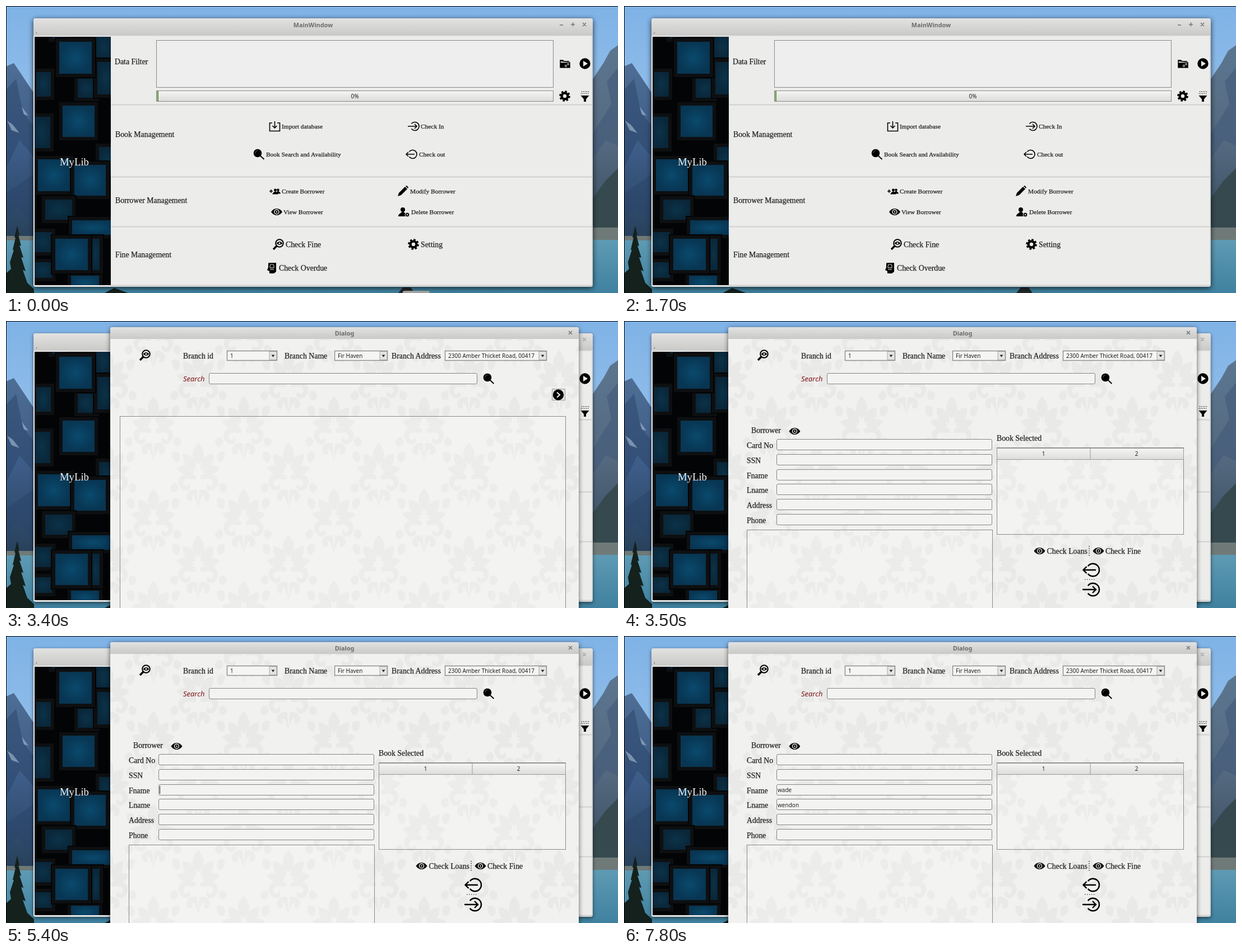
These frames come from a looping animation (1092 px wide and 513 px high, 8 s). An HTML page:

```html
<!DOCTYPE html>
<html lang="en">
<head>
<meta charset="utf-8">
<title>Library manager</title>
<style>
  html, body { margin: 0; width: 100%; height: 100%; overflow: hidden; background: #000; }
  svg { display: block; }
  text { font: 10px "Noto Sans", sans-serif; fill: #222; white-space: pre; }
  .label, .small, .brand { font-family: "Liberation Serif", serif; stroke: #222; stroke-width: .25px; }
  .label { font-size: 13.8px; }
  .small { font-size: 11.4px; }
  .brand { font-size: 18.7px; fill: #f4f4f4; stroke: none; }
  .title { font-size: 10.8px; font-weight: bold; fill: #6b6b6b; text-anchor: middle; }
  .mid { text-anchor: middle; }
  .search { font-size: 12.9px; font-style: italic; fill: #7d1414; }
  .line { fill: none; stroke: #000; }
  .box { fill: #fff; fill-opacity: .12; stroke: #8a8a8a; }
  .field { fill: #f3f3f1; stroke: #858585; }
</style>
</head>
<body>
<svg id="stage" width="1092" height="513" viewBox="0 0 1092 513">
  <defs>
    <linearGradient id="sky" x2="0" y2="1"><stop stop-color="#7fb2e6"/><stop offset="1" stop-color="#a9cff0"/></linearGradient>
    <linearGradient id="west" x2="0" y2="1"><stop stop-color="#4f6e95"/><stop offset=".5" stop-color="#3c5b86"/><stop offset="1" stop-color="#263f58"/></linearGradient>
    <linearGradient id="east" x2="0" y2="1"><stop stop-color="#5c7690"/><stop offset=".5" stop-color="#54697f"/><stop offset="1" stop-color="#34495a"/></linearGradient>
    <linearGradient id="lake" x2="0" y2="1"><stop stop-color="#5f9bb4"/><stop offset="1" stop-color="#3f819f"/></linearGradient>
    <linearGradient id="bar" x2="0" y2="1"><stop stop-color="#e2e2e1"/><stop offset="1" stop-color="#c9c9c7"/></linearGradient>
    <linearGradient id="head" x2="0" y2="1"><stop stop-color="#f5f5f4"/><stop offset="1" stop-color="#dcdcdb"/></linearGradient>
    <radialGradient id="tile"><stop stop-color="#0a5077"/><stop offset="1" stop-color="#073a5a"/></radialGradient>
    <clipPath id="side"><path d="M51 55h136v444H51z"/></clipPath>

    <path id="petal" d="M0-8C13-20 11-32 0-44C-11-32-13-20 0-8z"/>
    <g id="curl">
      <use href="#petal" transform="rotate(38)"/>
      <use href="#petal" transform="rotate(76) scale(.9)"/>
      <path d="M4 4C30-8 44 14 30 28C20 37 9 27 17 19C20 29 31 21 25 13C18 6 10 14 4 10zM2 30C12 26 24 34 20 46C14 54 8 48 11 43C12 36 4 40 0 62zM30-58C40-72 48-60 42-50C36-44 30-50 30-58zM34 46C46 40 52 54 44 64C36 64 32 54 34 46z"/>
    </g>
    <g id="motif">
      <use href="#petal" transform="translate(0 -6) scale(1.1)"/>
      <use href="#curl"/><use href="#curl" transform="scale(-1 1)"/>
    </g>
    <pattern id="damask" x="182" y="272" width="161" height="165" patternUnits="userSpaceOnUse">
      <rect width="161" height="165" fill="#f1f1f0"/>
      <g fill="#e9e9e8">
        <use href="#motif" x="81" y="82"/>
        <use href="#motif"/><use href="#motif" x="161"/>
        <use href="#motif" y="165"/><use href="#motif" x="161" y="165"/>
      </g>
    </pattern>

    <!-- Icons, centred on 0,0 -->
    <g id="eye">
      <path d="M-10 0C-5-8 5-8 10 0C5 8-5 8-10 0z"/>
      <circle r="4" fill="#000" stroke="#f0f0f0" stroke-width="1.5"/><circle r="1.2" fill="#f0f0f0"/>
    </g>
    <g id="gear">
      <circle r="5.4" class="line" stroke-width="4.4"/>
      <circle r="8.3" class="line" stroke-width="3" stroke-dasharray="3.5 3.02"/>
    </g>
    <g id="in" class="line" stroke-width="1.6"><path d="M-5.5-4.5A7.5 7.5 0 1 1-5.5 4.5M-12 0H4M0-4L4 0L0 4"/></g>
    <g id="out" class="line" stroke-width="1.6"><path d="M-5.5-4.5A7.5 7.5 0 1 1-5.5 4.5M4 0H-11M-7-4L-11 0L-7 4"/></g>
    <g id="lens"><circle cx="-2" cy="-2" r="7.3"/><path d="M3 3L9.5 9" class="line" stroke-width="1.8"/><path d="M-6-2A4 4 0 0 1-2-6.5" class="line" style="stroke:#888" stroke-width=".7"/></g>
    <g id="inspect">
      <circle cx="2" cy="-2" r="6.8" class="line" stroke-width="2"/><path d="M-3 3L-9 9" class="line" stroke-width="3.4"/>
      <path d="M-3.5-2Q2-8 7.5-2Q2 4-3.5-2z"/><circle cx="2" cy="-2" r="1.6" fill="#f0f0f0"/>
    </g>
    <g id="person"><circle cy="-4" r="4"/><path d="M-8 8C-8 3-3 3-2 0H2C3 3 8 3 8 8z"/></g>
    <g id="drop"><path d="M0 0h13v15H0z" fill="#e4e4e3" stroke="#999" stroke-width=".8"/><path d="M3.5 6h6L6.5 10z" fill="#222"/></g>
  </defs>

  <!-- Desktop -->
  <rect width="1092" height="420" fill="url(#sky)"/>
  <path d="M0 108L14 102L26 120L50 156V425H0z" fill="url(#west)"/>
  <path d="M0 150L18 130L30 190L50 215V270L24 240L0 290zM0 335L50 300V390L20 360L0 380z" fill="#2b456a" opacity=".5"/>
  <path d="M2 205L12 212L24 227L10 222zM28 180L40 196L32 194z" fill="#a9bdd3" opacity=".6"/>
  <path d="M1092 70L1078 80L1066 102L1046 132V425H1092z" fill="url(#east)"/>
  <path d="M1092 110L1072 135L1080 175L1046 230V275L1070 240L1092 250z" fill="#435b7a" opacity=".6"/>
  <path d="M1046 345L1070 312L1092 290V400H1046z" fill="#35494f"/>
  <rect y="416" width="1092" height="97" fill="url(#lake)"/>
  <path d="M0 411H50V419H0zM1046 396H1092V418H1046z" fill="#6f7a78"/>
  <path d="M20 393L24 410L22 409L27 429L24 428L31 450L27 449L35 474L30 472L38 495L50 506V513H0V478L9 470L7 458L14 436L12 436L17 414L15 414zM176 513L193 504L218 513z" fill="#14211d"/>
  <path d="M700 513L708 503H722L729 513z" fill="#22282a"/>
  <rect id="tip" x="708" y="509" width="48" height="12" rx="3" fill="#a7a7a5"/>

  <!-- Main window -->
  <g id="main">
    <rect id="frame" x="49" y="22" width="998" height="480" rx="4" fill="#d7d7d5"/>
    <path d="M49 53V26a4 4 0 0 1 4-4H1043a4 4 0 0 1 4 4V53z" fill="url(#bar)"/>
    <path d="M50 54H1046" stroke="#f8f8f8"/>
    <path d="M51 55H1045V499H51z" fill="#ececeb"/>
    <text class="title" x="548" y="38">MainWindow</text>
    <text x="53" y="49">.</text>
    <g id="controls" class="line" style="stroke:#747474" stroke-width="1.5">
      <path d="M988 34h6M1008 33h7M1011.5 29.5v7M1029 30l6 6m0-6l-6 6"/>
    </g>
    <g id="tiles" clip-path="url(#side)"><path d="M51 55h136v444H51z" fill="#030405"/></g>
    <path d="M50 54V500H187" fill="none" stroke="#f6f6f6" stroke-width="1.5"/>
    <text class="brand" x="96" y="285">MyLib</text>
    <path d="M188 176.5H1046M188 305.5H1046M188 394.5H1046M188 499.5H1046" stroke="#d1d1d0" stroke-width="2"/>

    <rect class="box" x="268.5" y="61.5" width="708" height="84"/>
    <rect x="268.5" y="151.5" width="708" height="19" fill="url(#head)" stroke="#8a8a8a"/>
    <path d="M269 152h3v18h-3z" fill="#8db568"/>
    <path d="M271.5 152v18" stroke="#5c7d43"/>
    <text class="mid" x="622.5" y="165">0%</text>

    <path d="M988 111V96h6l2 2h9v2h2v11zM990 99v2h15" stroke="#ececeb" stroke-width=".6"/>
    <circle cx="999" cy="107" r="1.6" class="line" style="stroke:#eee"/><circle cx="1003" cy="104" r="1.2" class="line" style="stroke:#eee"/>
    <circle cx="1033" cy="103" r="9.7"/><path d="M1030 98V108L1038 103z" fill="#f2f2f2"/>
    <use href="#gear" x="997" y="161"/>
    <path d="M1025.500 160H1040.500L1035 166.500V171H1031V166.500z"/>
    <path d="M1027 153H1040M1026 156.500H1040" class="line" stroke-width="1.600" stroke-dasharray="1 2"/>

    <path class="line" stroke-width="1.6" d="M475 209H470.500V223.500H488.500V209H484M479.500 206V218M475.500 214L479.500 218L483.500 214"/>
    <use href="#in" x="729" y="215"/>
    <use href="#lens" x="451" y="265"/>
    <use href="#out" x="725" y="265"/>
    <path d="M470 331h6M473 328v6" class="line" stroke-width="1.6"/>
    <use href="#person" transform="translate(485.500 331) scale(.55)"/>
    <use href="#person" transform="translate(480.500 331.500) scale(.62)"/>
    <path d="M699 340L701 334L712 323L716 327L705 338zM713 322L715 321L718 324L717 326z"/>
    <use href="#eye" x="483" y="368"/>
    <use href="#person" x="708" y="368"/>
    <circle cx="716" cy="373" r="4" stroke="#ececeb"/><path d="M714.500 371.500l3 3m0-3l-3 3" stroke="#eee"/>
    <use href="#inspect" x="486" y="426"/>
    <use href="#gear" x="727" y="426"/>
    <path d="M469 459H482V475L478 478H470V474L466 472L468 467V460z"/>
    <path d="M471 468V465a3.500 3.500 0 0 1 7 0V468zM471 471h7" fill="none" stroke="#eee"/>
  </g>

  <!-- Dialog -->
  <g id="dialog">
    <path d="M186 520V15a4 4 0 0 1 4-4H1018a4 4 0 0 1 4 4V520z" fill="url(#damask)" style="filter:drop-shadow(0 2px 4px #0009)"/>
    <path d="M186 32V15a4 4 0 0 1 4-4H1018a4 4 0 0 1 4 4V32z" fill="url(#bar)"/>
    <text class="title" x="604" y="26">Dialog</text>
    <path d="M1004 18l6 6m0-6l-6 6" stroke="#747474" stroke-width="1.5"/>
    <use href="#inspect" x="248" y="61"/>
    <text class="search" x="316" y="108">Search</text>
    <rect class="field" x="362.5" y="93.5" width="478" height="19" rx="2.5"/>
    <use href="#lens" x="861" y="103"/>
    <g id="list">
      <rect class="box" x="203.5" y="170.5" width="795" height="360"/>
      <path id="press" d="M974.5 121.5H997.5V141.5H974.5z" fill="#e3e3e2" stroke="#999"/>
      <circle cx="985.5" cy="132" r="9.7"/><path d="M983 127.500L988 132L983 136.500" fill="none" stroke="#f4f4f4" stroke-width="2"/>
    </g>
    <g id="form">
      <use href="#eye" x="304.5" y="197"/>
      <rect class="box" x="219.5" y="373.5" width="438" height="160"/>
      <rect class="box" x="665.5" y="226.5" width="333" height="155"/>
      <path d="M665.500 227.500H998.500V247.500H665.500zM832 227V248" fill="url(#head)" stroke="#9a9a9a"/>
      <text class="mid" x="748.5" y="241">1</text>
      <text class="mid" x="914.5" y="241">2</text>
      <use href="#eye" x="741.5" y="411"/>
      <use href="#eye" x="846.5" y="411"/>
      <path d="M830 402V421M822 462H842" class="line" stroke-width="1.2" stroke-dasharray="1.5 2.5"/>
      <use href="#out" transform="translate(836 445) scale(1.5)"/>
      <use href="#in" transform="translate(836 480) scale(1.5)"/>
    </g>
    <rect id="caret" width="1" height="14" fill="#111"/>
  </g>
  <path d="M0 .5H1092M.5 0V513" stroke="#000"/>
</svg>
<script>
const $ = id => document.getElementById(id);

function add(parent, tag, attrs, text = '') {
  const el = document.createElementNS('http://www.w3.org/2000/svg', tag);
  for (const k in attrs) el.setAttribute(k, attrs[k]);
  el.textContent = text;
  $(parent).append(el);
  return el;
}
const label = (parent, cls, x, y, text) => add(parent, 'text', { class: cls, x, y }, text);

// Sidebar blocks: x, y, width, height; those at the edges lie in shade
[[82, 40, 24, 18], [160, 52, 30, 42], [128, 130, 32, 34], [163, 100, 30, 58], [54, 118, 26, 44],
 [95, 64, 58, 57], [48, 198, 31, 56], [166, 252, 28, 46], [57, 274, 57, 57], [122, 284, 56, 55],
 [70, 346, 48, 36], [118, 383, 74, 26], [50, 404, 32, 36], [50, 458, 32, 28],
 [116, 482, 50, 24], [101, 178, 57, 56], [153, 416, 14, 56], [88, 416, 58, 56]
].forEach(([x, y, width, height]) => {
  const shade = width < 50 ? .55 : .9;
  add('tiles', 'rect', { x: x - 7, y: y - 7, width: width + 14, height: height + 14, fill: '#0d0f11', stroke: '#030405', 'stroke-width': 2 });
  add('tiles', 'rect', { x, y, width, height, fill: 'url(#tile)', opacity: shade });
});

[[194, 104, 'Data Filter'], [195, 234, 'Book Management'], [195, 352, 'Borrower Management'],
 [195, 449, 'Fine Management'], [499, 431, 'Check Fine'], [740, 431, 'Setting'], [487, 473, 'Check Overdue']
].forEach(a => label('main', 'label', ...a));

[[492, 219, 'Import database'], [740, 219, 'Check In'], [464, 269, 'Book Search and Availability'],
 [737, 269, 'Check out'], [492, 335, 'Create Borrower'], [721, 335, 'Modify Borrower'],
 [495, 372, 'View Borrower'], [723, 372, 'Delete Borrower']
].forEach(a => label('main', 'small', ...a));

// Branch selectors: label x, box x, box width, label, value
[[316, 394, 90, 'Branch id', '1'], [497, 586, 95, 'Branch Name', 'Fir Haven'],
 [688, 783, 182, 'Branch Address', '2300 Amber Thicket Road, 00417']
].forEach(([lx, x, w, name, value]) => {
  label('dialog', 'label', lx, 67, name);
  add('dialog', 'rect', { x: x + .5, y: 53.5, width: w - 1, height: 17, fill: '#f5f5f4', stroke: '#8c8c8c', 'stroke-width': 1.4 });
  add('dialog', 'use', { href: '#drop', x: x + w - 14, y: 54.5 });
  label('dialog', '', x + 6, 66, value);
});

[[227, 200, 'Borrower'], [665, 214, 'Book Selected'], [754.5, 416, 'Check Loans'], [859, 416, 'Check Fine']
].forEach(a => label('form', 'label', ...a));

['Card No', 'SSN', 'Fname', 'Lname', 'Address', 'Phone'].forEach((name, i) => {
  const y = Math.round(211 + 26.8 * i) + .5;
  label('form', 'label', 219, y + 15.5, name);
  add('form', 'rect', { class: 'field', x: 272.5, y, width: 384, height: 19, rx: 2.5 });
});

const search = { x: 365, y: 96 };
const first = { x: 274, y: 268, word: 'wade', keys: [5500, 5600, 5800, 5900] };
const last = { x: 274, y: 295, word: 'wendon', keys: [6400, 6700, 6800, 7000, 7100, 7300] };
for (const f of [first, last]) f.el = label('form', '', f.x, f.y + 11, '');

// Times at which the caret is visible
const blinks = [[1800, 2200, search], [2700, 3200, search], [3700, 4200, search],
  [4500, 4900, first], [5400, 6100, first], [6100, 7800, last]];

const show = (id, on) => { $(id).style.display = on ? '' : 'none'; };

function draw() {
  const t = performance.now() % 8000, open = t >= 1800;
  show('tip', t < 1200);
  show('dialog', open);
  show('list', t < 3500);
  show('press', t >= 3400);
  show('form', t >= 3500);
  $('controls').style.opacity = open ? .5 : 1;
  $('frame').style.filter = `drop-shadow(0 2px ${open ? 3 : 5}px #000${open ? 8 : 'b'})`;

  for (const f of [first, last])
    f.el.textContent = f.word.slice(0, f.keys.filter(k => t >= k).length);

  const blink = blinks.find(([from, to]) => t >= from && t < to);
  show('caret', blink);
  if (blink) {
    const { x, y, el } = blink[2];
    $('caret').setAttribute('x', x + (el ? Math.round(el.getComputedTextLength()) : 0));
    $('caret').setAttribute('y', y);
  }
  requestAnimationFrame(draw);
}
// Keep the caret above the generated fields
$('dialog').append($('form'), $('caret'));
draw();
</script>
</body>
</html>
```
